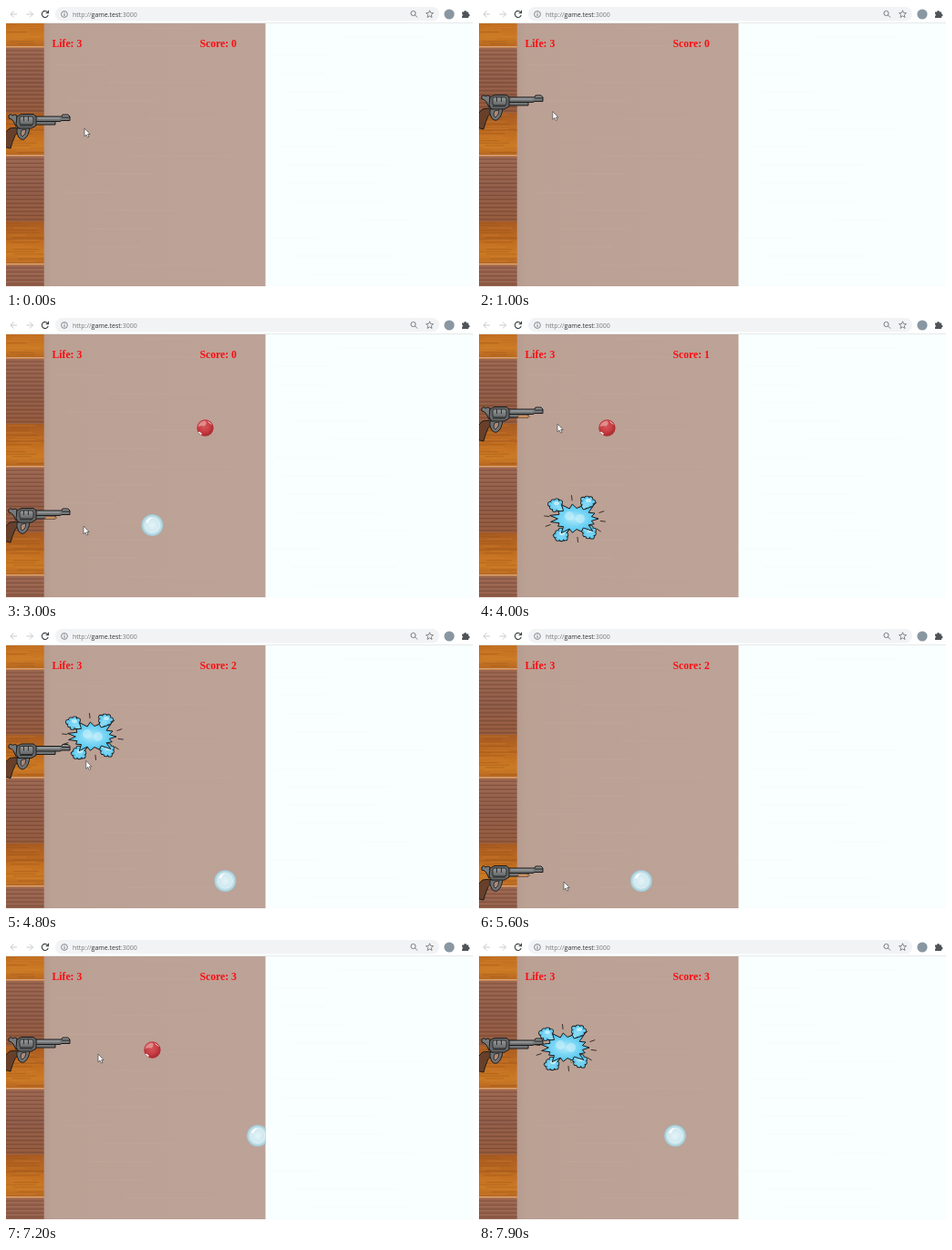
Animation of 512 by 310 pixels, one loop 8000 ms. Source, as an HTML page:

```html
<!DOCTYPE html>
<html lang="en">
<head>
<meta charset="utf-8">
<title>Bubble shooter</title>
<style>
html, body { margin: 0; width: 100%; height: 100%; overflow: hidden; background: #fff; }
svg { display: block; width: 100vw; height: 100vh; }
.hud { font: bold 11.7px "Liberation Serif", serif; fill: #fb0d12; }
.address { font: 7px "Open Sans", sans-serif; fill: #777; }
.ink { stroke: #1c1c1c; stroke-width: 1; stroke-linejoin: round; }
.icon { fill: none; stroke: #6b6f74; stroke-width: .9; }
</style>
</head>
<body>
<svg viewBox="0 0 512 310" xmlns="http://www.w3.org/2000/svg">
  <defs>
    <linearGradient id="steel" x2="0" y2="1">
      <stop stop-color="#999b9c"/><stop offset="1" stop-color="#626566"/>
    </linearGradient>
    <linearGradient id="field" x2="1" y2="0">
      <stop stop-color="#b59a8e"/><stop offset=".04" stop-color="#bba094"/><stop offset="1" stop-color="#bda297"/>
    </linearGradient>
    <linearGradient id="oak" x2="0" y2="1">
      <stop stop-color="#a85b22"/><stop offset=".45" stop-color="#c06c1f"/>
      <stop offset=".75" stop-color="#cc7a24"/><stop offset="1" stop-color="#b4641f"/>
    </linearGradient>
    <linearGradient id="slats" x2="0" y2="1">
      <stop stop-color="#9c6650"/><stop offset=".5" stop-color="#8f5b47"/><stop offset="1" stop-color="#95593a"/>
    </linearGradient>
    <radialGradient id="water">
      <stop stop-color="#e4f4f8"/><stop offset=".6" stop-color="#cfe8ef"/>
      <stop offset=".82" stop-color="#bbdde6"/><stop offset="1" stop-color="#9cc3ce"/>
    </radialGradient>
    <radialGradient id="ruby" cx=".45" cy=".4">
      <stop stop-color="#d4565a"/><stop offset=".65" stop-color="#ca4046"/><stop offset="1" stop-color="#b02f35"/>
    </radialGradient>
    <radialGradient id="splash">
      <stop stop-color="#b4eafa"/><stop offset=".5" stop-color="#7ad6f5"/><stop offset="1" stop-color="#4cc3ee"/>
    </radialGradient>
    <clipPath id="arena"><path d="M0 19H284.500V307H0Z"/></clipPath>
    <clipPath id="planks"><path d="M0 19H41.700V307H0Z"/></clipPath>
    <g id="blueBall">
      <circle r="12" fill="url(#water)"/>
      <circle r="8" fill="none" stroke="#f3fcfd" stroke-width=".8" opacity=".7"/>
      <path d="M-7-4Q-5-8 0-9Q-3-6-5-2Z" fill="#fff" opacity=".85"/>
    </g>
    <g id="redBall">
      <circle r="9.2" fill="url(#ruby)"/>
      <path d="M-8-1Q-7-7 0-8Q3-5-1-2Q-5-3-8-1Z" fill="#eab0ac" opacity=".65"/>
      <path d="M-7 4.500L-4 7" stroke="#fff" stroke-width="1.600"/>
      <path d="M3-7L7-4" stroke="#f3cfcc" stroke-width="1"/>
    </g>
  </defs>

  <path d="M0 0H512V19H0Z" fill="#fff"/>
  <rect x="54" y="1" width="421" height="15.5" rx="7.7" fill="#f1f3f4"/>
  <g class="icon">
    <path d="M12 9H5M8.5 5.5L5 9L8.5 12.5M22.5 9H29.5M26 5.5L29.5 9L26 12.5" stroke="#c3c5c8"/>
    <path d="M45.8 7A3.5 3.5 0 1 0 46.2 10M46.5 4.8V7.7H43.6" stroke="#3c4043" stroke-width="1.100"/>
    <circle cx="64" cy="9" r="3.4" stroke-width=".8"/>
    <path d="M64 8.3V11M64 6.7V7.5"/>
    <circle cx="446.5" cy="8" r="2.6"/><path d="M448.5 10L451 12.5"/>
    <path d="M464.500 4.800L465.600 7.500L468.500 7.700L466.300 9.600L467 12.500L464.500 10.900L462 12.500L462.700 9.600L460.500 7.700L463.400 7.500Z" stroke-width=".8"/>
  </g>
  <circle cx="486" cy="9" r="5.600" fill="#8997a2"/>
  <path d="M500 6.500H502A1.500 1.500 0 0 1 505 6.500H507V8.500A1.500 1.500 0 0 1 507 11.500V13H500V11A1.400 1.400 0 0 0 500 8.500Z" fill="#505459"/>
  <text class="address" x="73" y="11.500">http://<tspan fill="#333">game.test</tspan>:3000</text>

  <path d="M0 18.500H512V307H0Z" fill="#f8fffe"/>
  <path d="M0 18.500H512" stroke="#e2e5e5" stroke-width=".8"/>
  <path d="M41 19H284.500V307H41Z" fill="url(#field)"/>
  <g id="scenery" clip-path="url(#planks)"></g>
  <g id="grain"></g>

  <g clip-path="url(#arena)">
    <use id="blue" href="#blueBall"/>
    <use id="red" href="#redBall"/>
    <g id="gun" class="ink">
      <path d="M4 17L13 16L15 19Q9 24 7 32L5 39L-3 37V24Z" fill="#68402a"/>
      <path d="M12 17Q11 22 14 27Q18 31 21 28Q25 25 26 16Z" fill="#6f7273"/>
      <path d="M17 19Q15 25 18 26Q22 24 22 18Z" fill="#a98a7b" stroke-width=".8"/>
      <path d="M3 3Q5 0 7 3Q10 1 12 3V8L14 12L11 15L8 9Q6 6 3 6Z" fill="#777a7b"/>
      <path d="M32 9H54V13H32Z" fill="#737677"/>
      <path d="M32 4H61L62 2H68L70 4V8.500H61L59 9.500H32Z" fill="url(#steel)"/>
      <path d="M61 5H70" stroke-width="1"/>
      <path d="M12 4L17 1.500H30L33 4V14L28 17H14L11 13Z" fill="#656869"/>
      <rect x="15" y="4" width="15" height="9" rx="2" fill="url(#steel)" stroke-width=".8"/>
      <path d="M19.500 4V9M24.500 4V9M15 14H29" stroke-width=".8"/>
      <path d="M35 6H59" stroke="#b4b6b6" stroke-width=".7"/>
    </g>
    <path id="bullet" d="M0-1.200H9Q12-1 13 0Q12 1 9 1.200H0Z" fill="#d9a06a" stroke="#6b3d22" stroke-width=".5"/>
    <text class="hud" x="50.500" y="44.500">Life: 3</text>
    <text class="hud" id="score" x="212.500" y="44.500"></text>
  </g>
  <path id="cursor" d="M0 0V8.800L2 7L3.500 10L5 9.400L3.600 6.500H6.200Z" fill="#fff" stroke="#555" stroke-width=".8"/>
  <g id="burst"></g>
</svg>
<script>
const LOOP = 8000;
const $ = id => document.getElementById(id);

let seed = 7;
const random = () => (seed = seed * 16807 % 2147483647) / 2147483647;

function line(x1, x2, y, color, width, opacity) {
  return `<path d="M${x1} ${y}H${x2}" stroke="${color}" stroke-width="${width}" opacity="${opacity}"/>`;
}

// Each plank repeat is a slatted brown band, an orange band and a pale seam.
function wall() {
  let out = '';
  for (let top = -73; top < 307; top += 119) {
    out += `<rect y="${top}" width="42" height="72" fill="url(#slats)"/>
      <rect y="${top + 71}" width="42" height="48" fill="url(#oak)"/>`;
    for (let y = 3; y < 71; y += 4.4) {
      out += line(0, 42, top + y, '#5f3a2c', .9, .5) + line(0, 42, top + y + 1.6, '#b08371', .8, .35);
    }
    for (let y = 73; y < 117; y += 2.6) {
      const x = random() * 20 - 6;
      out += line(x, x + 18 + random() * 20, top + y, random() < .5 ? '#8f4c15' : '#d88a38', 1, .35);
    }
    out += line(0, 42, top + 90, '#8a4a18', 1, .5) + line(0, 42, top + 117.8, '#dcb08c', 1.6, .85);
  }
  return out;
}

function grain() {
  let out = '';
  for (let i = 0; i < 28; i++) {
    const right = i % 2, x = right ? 290 + random() * 100 : 45 + random() * 110;
    out += line(x, x + 50 + random() * 70, 24 + i * 10, right ? '#e6f0f0' : '#c6aea3', .7, .4);
  }
  return out;
}

function cloud(x, y) {
  const puffs = Array.from({ length: 8 }, (_, i) => {
    const a = i * Math.PI / 4 + x, r = 1 + .12 * Math.sin(i * 2.3 + y);
    return [x + 5.5 * r * Math.cos(a), y + 4.8 * r * Math.sin(a)];
  });
  const draw = (r, color) => puffs.map(([a, b]) => `<circle cx="${a}" cy="${b}" r="${r}" fill="${color}"/>`).join('');
  const stem = (width, color) =>
    `<path d="M${x} ${y}L${x * .5} ${y * .5}" stroke="${color}" stroke-width="${width}"/>`;
  return `${stem(7, '#1c1c1c')}${draw(2.9, '#1c1c1c')}${draw(2.1, '#62cbf0')}
    <ellipse cx="${x}" cy="${y}" rx="5" ry="4.5" fill="#78d3f3"/>${stem(5, '#86d9f5')}
    <ellipse cx="${x + 1}" cy="${y - 2}" rx="3" ry="2" fill="#c9f1fc" opacity=".8"/>`;
}

function explosion() {
  const spikes = 15, points = [];
  for (let i = 0; i < spikes * 2; i++) {
    const a = i * Math.PI / spikes, r = i % 2 ? .72 : 1 + .14 * Math.sin(i * 2);
    points.push(`${(26 * r * Math.cos(a)).toFixed(1)},${(16 * r * Math.sin(a)).toFixed(1)}`);
  }
  let rays = '';
  for (let i = 0; i < 14; i++) {
    const a = i * Math.PI / 7 + .12, c = Math.cos(a), s = Math.sin(a);
    rays += `M${28 * c} ${20 * s}L${34 * c} ${26 * s}`;
  }
  return `<path d="${rays}" stroke="#3a302c" stroke-width="1"/>
    ${cloud(-21, -15)}${cloud(14, -18)}${cloud(-15, 18)}${cloud(16, 15)}
    <polygon class="ink" points="${points.join(' ')}" fill="url(#splash)"/>
    <circle cx="-6" cy="-3" r="5" fill="#d4f3fc" opacity=".5"/>
    <circle cx="6" cy="0" r="5" fill="#d4f3fc" opacity=".5"/>`;
}

$('scenery').innerHTML = wall();
$('grain').innerHTML = grain();
$('burst').innerHTML = explosion();

// time, cursor x, cursor y, gun top
const aim = [
  [0, 86, 134, 117], [600, 86, 134, 117], [1800, 66, 63, 36], [2000, 66, 63, 36],
  [2900, 85, 229, 208], [3550, 85, 229, 208], [3950, 86, 117, 97], [4100, 86, 117, 97],
  [4300, 87, 126, 106], [4600, 87, 126, 106], [5500, 93, 278, 259], [6350, 93, 278, 259],
  [7100, 101, 126, 106], [7400, 101, 126, 106], [7800, 101, 127, 107], [LOOP, 101, 127, 107]
];

// Balls pass through x at time `at`, moving left at `speed` px/ms.
const blues = [
  { from: 1200, to: 3550, at: 3000, x: 160.5, y: 228, speed: .0764 },
  { from: 4050, to: 6350, at: 5600, x: 178, y: 277, speed: .078 },
  { from: 6900, to: LOOP, at: 7200, x: 276, y: 215.5, speed: .087 }
];
const reds = [
  { from: 2000, to: 4450, at: 3000, x: 218.5, y: 121.5, speed: .078 },
  { from: 5600, to: 7850, at: 7200, x: 160.5, y: 121.5, speed: .087 }
];
const shots = [
  { load: 2900, hit: 3550, x: 105, y: 221 },
  { load: 3900, hit: 4450, x: 95, y: 119 },
  { load: 5500, hit: 6350, x: 108, y: 270 },
  { load: 7600, hit: 7850, x: 95, y: 119 }
];
const FLIGHT = 250, BURST = 700;

function pose(t) {
  const i = Math.max(1, aim.findIndex(k => k[0] > t));
  const a = aim[i - 1], b = aim[i], p = (t - a[0]) / (b[0] - a[0]);
  const e = p * p * (3 - 2 * p);
  return a.map((v, j) => v + (b[j] - v) * e);
}

function place(id, x, y) {
  $(id).setAttribute('transform', `translate(${x.toFixed(2)} ${y.toFixed(2)})`);
}

function show(id, item, x, y) {
  $(id).style.display = item ? '' : 'none';
  if (item) place(id, x(item), y(item));
}

function render(t) {
  const [, x, y, top] = pose(t);
  place('cursor', x, y);
  place('gun', 0, top);

  for (const [id, list] of [['blue', blues], ['red', reds]]) {
    const ball = list.find(b => t >= b.from && t < b.to);
    show(id, ball, b => b.x - (t - b.at) * b.speed, b => b.y);
  }

  const loaded = shots.find(s => t >= s.load && t < s.hit);
  show('bullet', loaded,
    s => 43 + (s.x - 58) * Math.max(0, 1 - (s.hit - t) / FLIGHT), () => top + 12);

  const burst = shots.find(s => t >= s.hit && t < s.hit + BURST);
  show('burst', burst, s => s.x, s => s.y);

  const score = Math.min(3, shots.filter(s => t >= s.hit).length);
  $('score').textContent = `Score: ${score}`;
}

const start = performance.now();
function tick() {
  render((performance.now() - start) % LOOP);
  requestAnimationFrame(tick);
}
tick();
</script>
</body>
</html>
```
